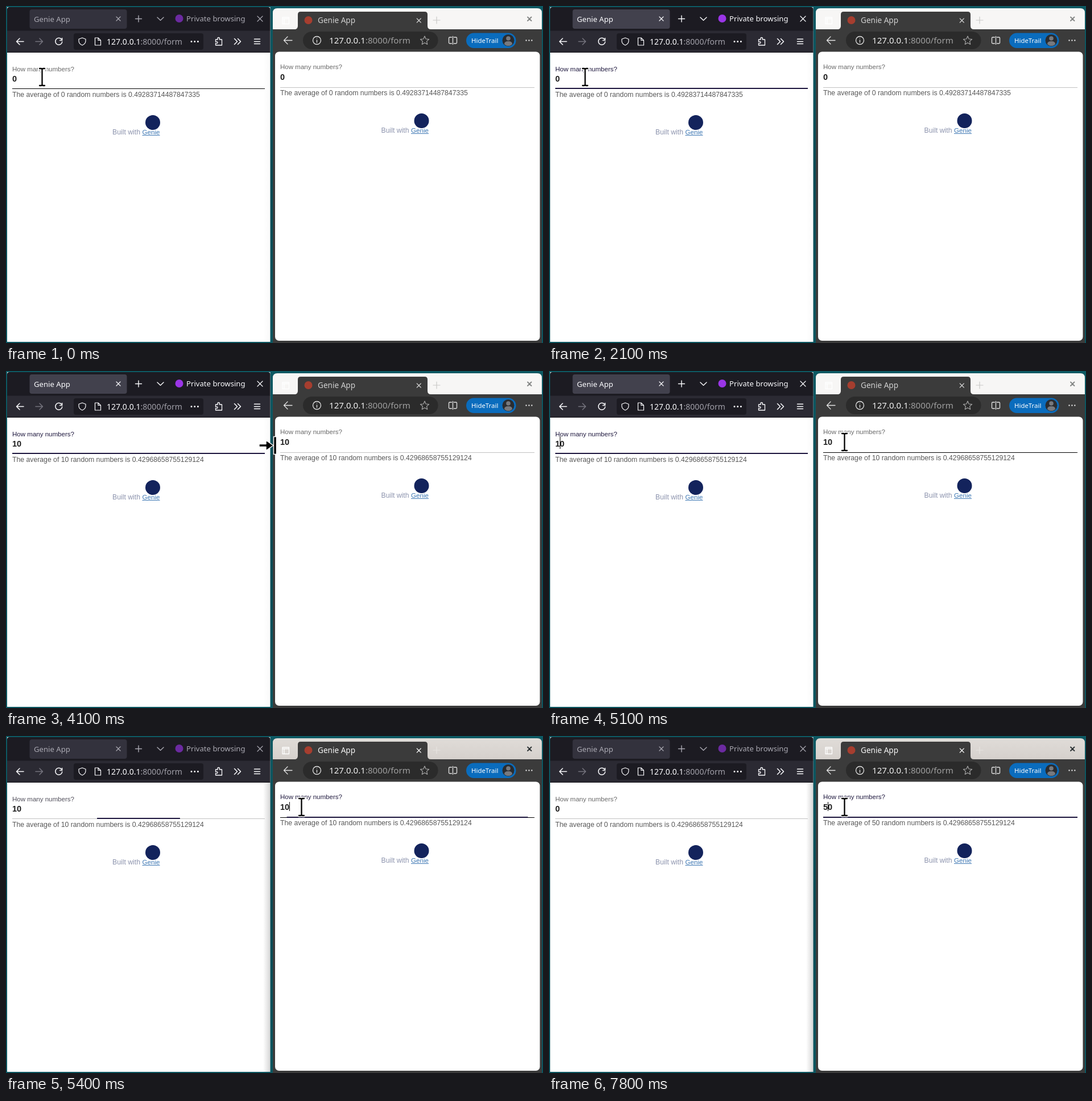
Write an HTML page that moves like this. It is 944x593 px and loops after 8000 ms.

```html
<!DOCTYPE html>
<html lang="en">
<head>
<meta charset="utf-8">
<title>Form sync demo</title>
<style>
  html, body { margin: 0; width: 100%; height: 100%; overflow: hidden; background: #0b515b; }
  svg { display: block; width: 944px; height: 593px; }
  text { white-space: pre; }
  .ui { font-family: "Noto Sans", sans-serif; }
  .page { font-family: "Liberation Sans", Arial, sans-serif; }
  .line { fill: none; stroke: currentColor; stroke-linecap: round; stroke-linejoin: round; }
  .avg { font-size: 12.24px; fill: #585858; }
  .label { font-size: 11.54px; }
  .value { font-size: 14.5px; font-weight: 700; fill: #1d1d1d; }
</style>
</head>
<body>
<svg viewBox="0 0 944 593">
  <defs>
    <linearGradient id="desk" x1="0" y1="0" x2="0" y2="1">
      <stop offset="0" stop-color="#0d5963"/><stop offset=".5" stop-color="#0a4a54"/><stop offset="1" stop-color="#0c5660"/>
    </linearGradient>
    <linearGradient id="bar" x1="0" y1="0" x2="0" y2="1">
      <stop offset="0" stop-color="#e0dcd8"/><stop offset="1" stop-color="#d5d0cc"/>
    </linearGradient>
    <linearGradient id="shade">
      <stop offset="0" stop-color="#000" stop-opacity="0"/><stop offset="1" stop-color="#000" stop-opacity=".16"/>
    </linearGradient>
  </defs>
  <rect width="944" height="593" fill="url(#desk)"/>

  <!-- left browser -->
  <g>
    <rect x="2" y="2" width="462.500" height="589" fill="#fff"/>
    <path d="M2 44V6Q2 2 6 2H460.500Q464.500 2 464.500 6V44Z" fill="#1c1b22"/>
    <rect x="2" y="43.500" width="462.500" height="38" fill="#2b2a33"/>
    <rect x="2" y="81" width="462.500" height="1" fill="#0f0e14"/>
    <rect id="tab" x="41.500" y="6" width="171" height="34" rx="4"/>
    <rect x="119" y="48" width="228" height="29" rx="4" fill="#1c1b22"/>
    <g id="title" class="ui" font-size="13.150">
      <text x="49" y="27.500" fill="currentColor">Genie App</text>
      <text x="317" y="27.300" fill="currentColor">Private browsing</text>
      <path class="line" stroke-width="1.200" d="M194 19l7 7m0-7l-7 7M442 18l9 9m0-9l-9 9"/>
      <path class="line" stroke-width="1.400" d="M227.500 22.500h11m-5.500-5.500v11M266 20l5.500 5.300 5.500-5.300"/>
    </g>
    <circle id="mask" cx="304.500" cy="22" r="7"/>
    <g color="#fbfbfe" stroke-width="1.500">
      <path class="line" d="M31 62.500H18.500M24 57l-5.500 5.500L24 68"/>
      <path class="line" color="#74737d" d="M52 62.500h12.500M59 57l5.500 5.500L59 68"/>
      <path class="line" d="M97.500 58.500a6 6 0 1 0 1.300 4.500M98.600 56.500v4h-4"/>
      <path class="line" stroke-width="1.200" d="M134 56l6 2.200v3.300q0 5-6 7.500-6-2.500-6-7.500v-3.300Z"/>
      <path class="line" stroke-width="1.200" d="M156.500 56h5.500l4.500 4.500V69h-10ZM162 56v4.500h4.500"/>
      <path class="line" d="M401.500 57.500l5 5-5 5M407.500 57.500l5 5-5 5M436.500 58.200h10m-10 4.200h10m-10 4.200h10"/>
      <path class="line" stroke-width="1.300" d="M368.500 59h3.700q-1-3.500 1.500-3.500t1.500 3.500h4.300v10h-11v-3.500q3.500 1 3.500-1.200t-3.500-1.200Z"/>
      <path class="line" stroke-width="3" d="M326 62.500h.01m5.700 0h.01m5.700 0h.01"/>
    </g>
    <text class="ui" x="177" y="68" font-size="14.060" fill="#fbfbfe">127.0.0.1<tspan fill="#a09fa8">:8000/form</tspan></text>
    <rect id="shadow" x="452" y="82" width="12.500" height="509" fill="url(#shade)"/>
  </g>
  <g id="formL" class="page"></g>

  <!-- right browser -->
  <g>
    <path d="M469 593V12Q469 4 477 4H934Q942 4 942 12V593Z" fill="#3b3b3b"/>
    <path id="head" d="M469 41V12Q469 4 477 4H934Q942 4 942 12V41Z"/>
    <path d="M507 41q6 0 6-6V15q0-5 5-5H736q5 0 5 5V35q0 6 6 6Z" fill="#3b3b3b"/>
    <rect x="473" y="80.500" width="465.500" height="508.500" rx="7" fill="#fff"/>
    <rect x="522" y="45" width="237.500" height="31" rx="15.500" fill="#2b2b2b"/>
    <circle cx="531.500" cy="25" r="7" fill="#a63e2f"/>
    <path class="line" color="#fff" stroke-width="1.300" d="M486 20h11.500v11.500H486ZM486 22.500h11.500M489 22.500v9"/>
    <path id="plus" class="line" stroke-width="1.200" d="M751 25h12m-6-6v12"/>
    <path id="close" class="line" stroke-width="1.900" d="M917 19.500l6.500 6.500m0-6.500l-6.500 6.500"/>
    <g id="tabR">
      <text class="ui" x="548" y="30.300" font-size="13.600" fill="currentColor">Genie App</text>
      <path class="line" stroke-width="1.200" d="M722.300 22l7 7m0-7l-7 7"/>
    </g>
    <g color="#e3e3e3" stroke-width="1.300">
      <path class="line" d="M503 60.500H488.500M495 54l-6.500 6.500L495 67"/>
      <circle class="line" cx="546.500" cy="60.500" r="7"/>
      <path class="line" d="M546.500 60v4m0-7.200v.01"/>
      <path id="star" class="line" color="#a6a6a6" stroke-width="1.200"/>
      <path class="line" d="M783.500 55h-3.500q-1.500 0-1.500 1.500v8q0 1.500 1.500 1.500h3.500M787.500 55h3.500q1.500 0 1.500 1.500v8q0 1.500-1.500 1.500h-3.500M785.500 53.500v14"/>
      <path class="line" stroke-width="2.400" d="M914.500 60.500h.01m4.900 0h.01m4.900 0h.01"/>
    </g>
    <text class="ui" x="568" y="66" font-size="15.100" fill="#f0f0f0">127.0.0.1<tspan fill="#9f9f9f">:8000/form</tspan></text>
    <rect x="809" y="47.500" width="87.500" height="26.500" rx="13.250" fill="#0a6cbd"/>
    <text class="ui" x="818" y="65" font-size="11.400" fill="#fff">HideTrail</text>
    <circle cx="883" cy="60.500" r="10.500" fill="#2a2c30"/>
    <circle cx="883" cy="57" r="3.800" fill="#77797e"/>
    <path d="M876 67q0-5 7-5t7 5q-3 3.300-7 3.300T876 67Z" fill="#77797e"/>
  </g>
  <g id="formR" class="page"></g>

  <g id="beam" class="line" color="#000">
    <path id="beamEdge" d="M-4.500-15H-2Q0-15 0-13V13Q0 15-2 15H-4.500M4.500-15H2Q0-15 0-13M0 13Q0 15 2 15H4.500" stroke="#fff" stroke-width="5"/>
    <use href="#beamEdge"/>
    <path d="M-4.500-15H-2Q0-15 0-13V13Q0 15-2 15H-4.500M4.500-15H2Q0-15 0-13M0 13Q0 15 2 15H4.500" stroke-width="2.300"/>
  </g>
  <g id="resize" stroke="#fff" stroke-width="1.500" stroke-linejoin="round">
    <path d="M445 128.500h12v-6.500l13 9-13 9v-6.500h-12Z"/>
    <rect x="470.500" y="115.500" width="5" height="31"/>
  </g>
</svg>
<script>
const LOOP = 8000, STEP = 100;
const $ = id => document.getElementById(id);
const set = (el, attrs) => { for (const k in attrs) el.setAttribute(k, attrs[k]); };
const A = '0.49283714487847335', B = '0.42968658755129124';

// Each table: [start ms, state...]; the latest started row holds.
const rows = {
  textL: [[0, '0', A], [2600, '10', A], [3100, '10', B], [6800, '0', B]],
  textR: [[0, '0', A], [3100, '10', A], [3200, '10', B], [6600, '0', B], [7800, '50', B]],
  caretL: [[0, 0], [900, 19.5], [1900, 11.5], [2100, 0], [2600, 19.5], [3400, 0], [4600, 19.5], [5300, 0]],
  caretR: [[0, 0], [5200, 498.5], [5800, 0], [6000, 490.5], [6500, 0], [6600, 482.5], [7200, 0], [7800, 490.5]],
  mouse: [[0, 63.5, 125], [2600, 0, 0], [3700, 285, 151], [3800, 332, 147], [3900, 384, 141], [4000, 430, 136],
    [4100, -1, 0], [4200, 491, 127], [4300, 506, 125], [4400, 514, 125], [4500, 519.5, 125]]
};
const at = (name, t) => rows[name].filter(r => r[0] <= t).pop().slice(1);

// cubic-bezier(.4, 0, .2, 1)
function ease(x) {
  if (x <= 0) return 0;
  if (x >= 1) return 1;
  let lo = 0, hi = 1, u;
  for (let i = 0; i < 24; i++) {
    u = (lo + hi) / 2;
    const bx = 1.2 * u * (1 - u) ** 2 + 0.6 * u * u * (1 - u) + u ** 3;
    if (bx < x) lo = u; else hi = u;
  }
  return 3 * u * u * (1 - u) + u ** 3;
}
const grow = (t, start) => ease((t - start) / 360);
const mix = (a, b, p) => `rgb(${a.map((v, i) => Math.round(v + (b[i] - v) * p))})`;

// x, width of the field, then baselines and line positions
function makeForm(id, x, w, y) {
  const g = $(id);
  g.innerHTML = `
    <text class="label" x="${x}" y="${y.label}">How many numbers?</text>
    <text class="value" x="${x}" y="${y.value}"></text>
    <rect class="base" x="${x}" y="${y.line}" width="${w}" height="1"/>
    <rect class="focus" y="${y.line - 1}" height="2" fill="#1b143c"/>
    <rect class="caret" y="${y.caret}" width="1" height="${y.tall}" fill="#000"/>
    <text class="avg" x="${x}" y="${y.avg}"></text>
    <text x="${y.foot}" y="${y.built}" font-size="12.24" fill="#8d94ae">Built with</text>
    <text x="${y.foot + 52.5}" y="${y.built}" font-size="11.6" fill="#3e78b4">Genie</text>
    <rect x="${y.foot + 52.5}" y="${y.built + 1}" width="31" height="1" fill="#3e78b4"/>
    <circle cx="${y.foot + 71}" cy="${y.built - 21}" r="13" fill="#13235c"/>`;
  const part = c => g.querySelector('.' + c);
  const p = { label: part('label'), value: part('value'), base: part('base'), focus: part('focus'), caret: part('caret'), avg: part('avg') };
  return ([num, mean], caret, focus, hover) => {
    p.value.textContent = num;
    p.avg.textContent = `The average of ${num} random numbers is ${mean}`;
    p.label.setAttribute('fill', mix([104, 104, 104], [30, 24, 62], focus));
    p.base.setAttribute('fill', mix([194, 194, 194], [0, 0, 0], hover));
    set(p.focus, { x: x + w * (1 - focus) / 2, width: w * focus });
    set(p.caret, { x: caret - 0.5, opacity: caret ? 1 : 0 });
  };
}
const drawL = makeForm('formL', 11, 444, { label: 114.5, value: 132.5, line: 145, caret: 115, tall: 22, avg: 160, foot: 187, built: 226 });
const drawR = makeForm('formR', 482, 447, { label: 110.5, value: 130, line: 143, caret: 116, tall: 16, avg: 157, foot: 659.5, built: 223 });

let star = '';
for (let i = 0; i < 10; i++) {
  const r = i % 2 ? 3.7 : 8, a = Math.PI * (i / 5 - 0.5);
  star += (i ? 'L' : 'M') + (736 + r * Math.cos(a)).toFixed(2) + ' ' + (61 + r * Math.sin(a)).toFixed(2);
}
$('star').setAttribute('d', star + 'Z');

function draw(t) {
  const left = t >= 900 && t < 5300, right = t >= 5200;
  set($('tab'), { fill: left ? '#42414d' : '#33323d' });
  set($('title'), { color: left ? '#fbfbfe' : '#aaa9b2' });
  set($('mask'), { fill: left ? '#9a35e6' : '#6b2aa0' });
  set($('shadow'), { opacity: right ? 1 : 0.15 });
  set($('head'), { fill: right ? 'url(#bar)' : '#f7f6f5' });
  set($('plus'), { color: right ? '#e6e3e0' : '#c9c8c7' });
  set($('close'), { color: right ? '#2e3436' : '#858786' });
  set($('tabR'), { color: right ? '#f5f5f5' : '#d0d0d0' });

  drawL(at('textL', t), at('caretL', t)[0], grow(t, 880) - grow(t, 5245), t < 5300 ? 1 : 0);
  drawR(at('textR', t), at('caretR', t)[0], grow(t, 5140), grow(t, 4140));

  const [x, y] = at('mouse', t);
  set($('beam'), { transform: `translate(${x} ${y})`, opacity: x > 0 ? 1 : 0 });
  set($('resize'), { opacity: x < 0 ? 1 : 0 });
}

const begin = performance.now();
function tick(now) {
  const t = Math.max(0, now - begin) % LOOP;
  draw(Math.floor(t / STEP) * STEP);
  requestAnimationFrame(tick);
}
draw(0);
requestAnimationFrame(tick);
</script>
</body>
</html>
```
